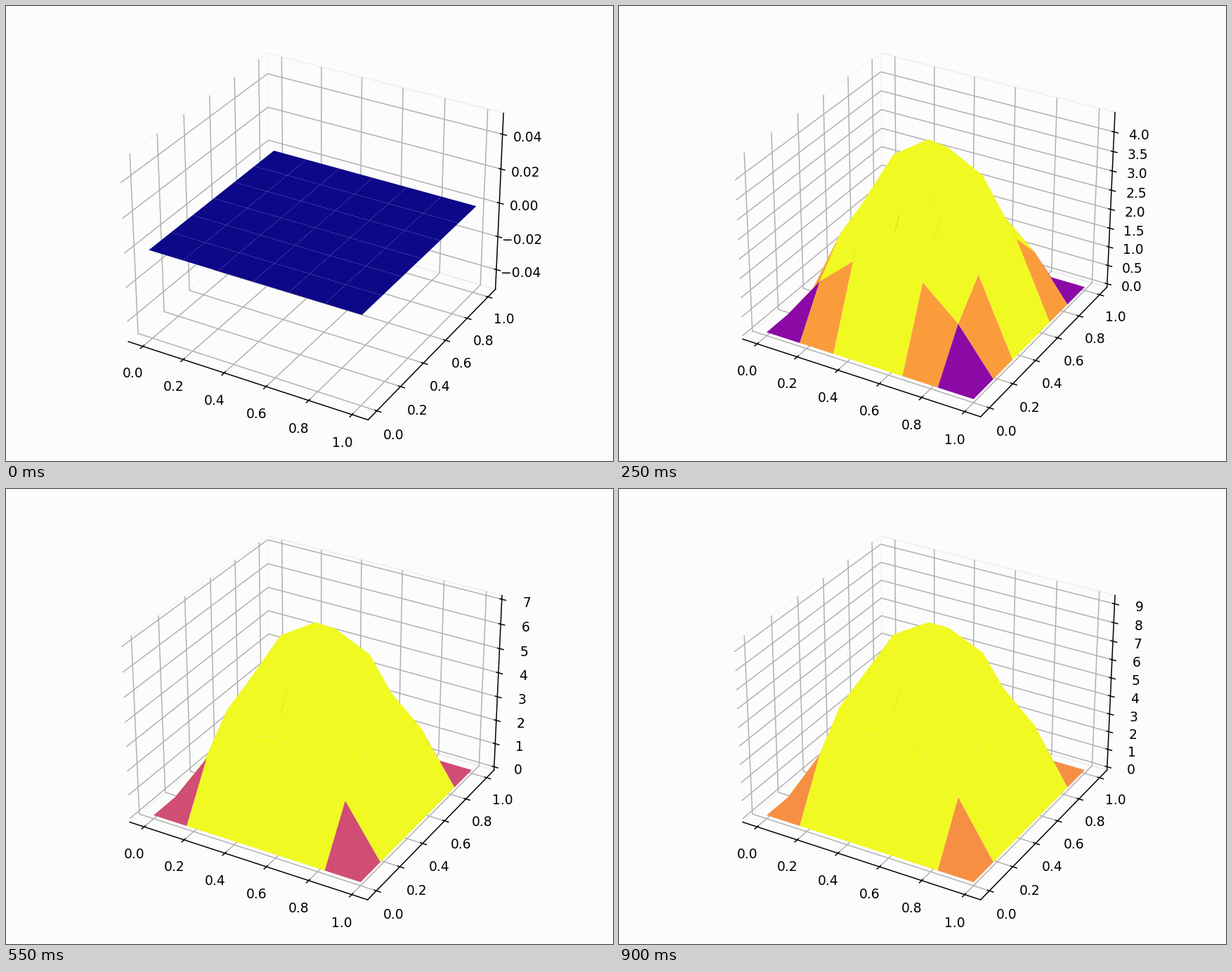
A matplotlib script for the animation above (0.95 s loop, 864x648 px).

```python
import numpy as np
import matplotlib.pyplot as plt
from matplotlib.animation import FuncAnimation

W, H, DPI = 864, 648, 135
FRAMES, INTERVAL = 19, 50
BG = "#fcfcfc"
PAD = 20.25          # outer margin in pixels
LABEL_ROOM = 4.7     # extra bottom space for the tick labels after the start

plt.rcParams.update({"figure.facecolor": BG, "axes.facecolor": BG})

N = 7
X, Y = np.meshgrid(np.linspace(0, 1, N), np.linspace(0, 1, N))


def steady_profile():
    """Poisson solution, zero on the border, heated in the middle square."""
    n = N - 2
    d = np.arange(n) - n // 2
    dx, dy = np.meshgrid(d, d)
    inside = np.maximum(abs(dx), abs(dy)) <= 1
    source = inside / (1 + 0.62 * (dx**2 + dy**2))
    line = 2 * np.eye(n) - np.eye(n, k=1) - np.eye(n, k=-1)
    laplace = np.kron(line, np.eye(n)) + np.kron(np.eye(n), line)
    u = np.linalg.solve(laplace, source.ravel()).reshape(n, n)
    return np.pad(u / u.max(), 1)


PROFILE = steady_profile()


def heights(t):
    """Solve z^2 + a z = load: the conductivity rises with z."""
    a = 2.75
    flank = PROFILE**2 * (1 - PROFILE)**2.5
    profile = PROFILE + 0.46 * np.log(max(t, 1) / 2) * flank
    load = 6.45 * t**0.985 * profile
    return np.sqrt(a * a / 4 + load) - a / 2


fig = plt.figure(figsize=(W / DPI, H / DPI), dpi=DPI)
ax = fig.add_subplot(projection="3d")


def place_axes(bottom):
    ax.set_position([PAD / W, bottom / H,
                     1 - 2 * PAD / W, (H - PAD - bottom) / H])


def trim_zticks():
    """Keep z ticks within the data range, without the drawn margin."""
    lo, hi = ax.get_zlim()
    margin = (hi - lo) / 50
    lo, hi = lo + margin, hi - margin
    ticks = ax.zaxis.get_major_locator().tick_values(lo, hi)
    eps = 1e-6 * (hi - lo)
    ax.set_zticks([v for v in ticks if lo - eps <= v <= hi + eps])


def update(t):
    ax.clear()
    place_axes(PAD + LABEL_ROOM * (t > 0))
    for axis in (ax.xaxis, ax.yaxis, ax.zaxis):
        axis.pane.fill = False
    ax.plot_surface(X, Y, heights(t), cmap="plasma", vmin=0, vmax=1)
    trim_zticks()
    return []


anim = FuncAnimation(fig, update, frames=FRAMES, interval=INTERVAL,
                     repeat=True, repeat_delay=0, blit=False)
plt.show()
```
